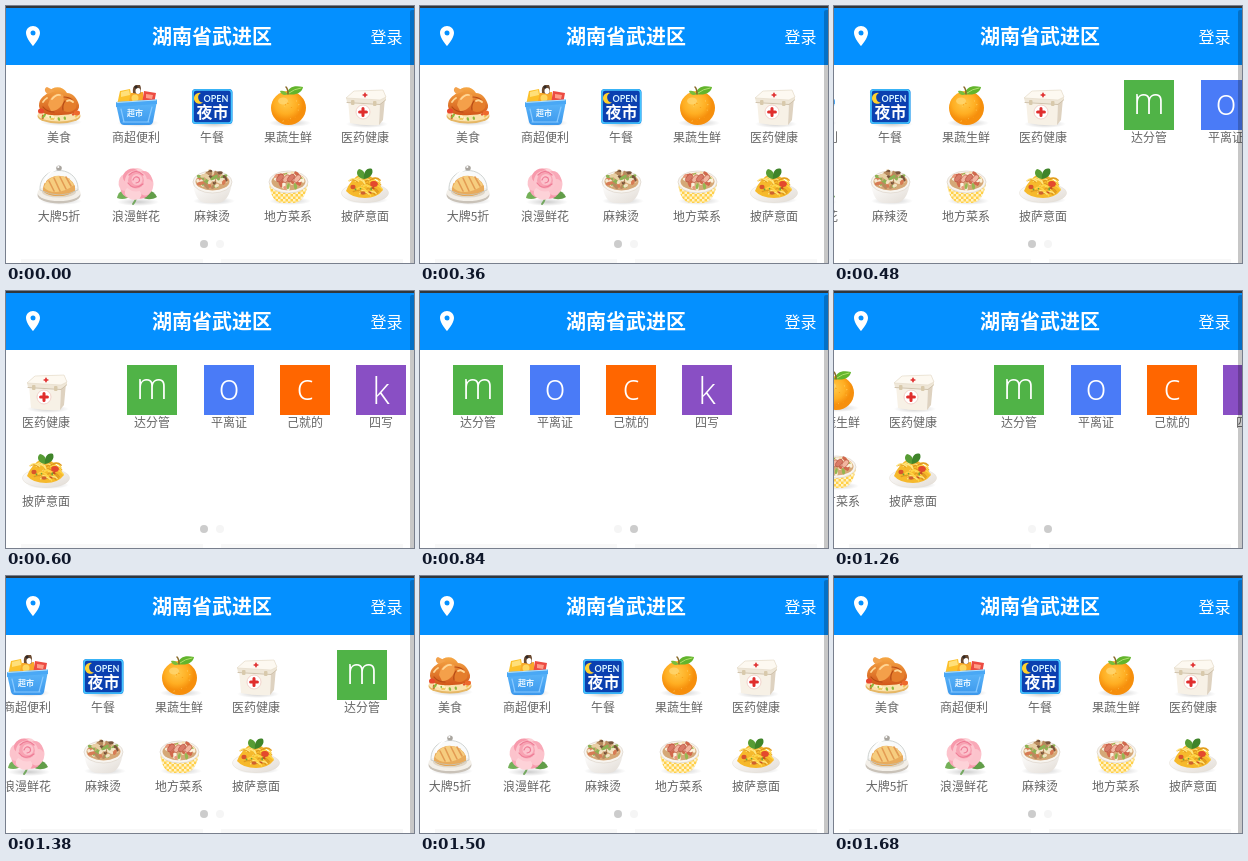
Write an HTML page that moves like this. It is 408 by 257 pixels and loops after 2.28 s.

```html
<!DOCTYPE html>
<html lang="zh">
<head>
<meta charset="utf-8">
<style>
html, body { margin: 0; width: 100%; height: 100%; overflow: hidden; background: #fff; }
svg { display: block; }
text { font-family: "Noto Sans CJK SC", "Noto Sans CJK", "Noto Sans", sans-serif; text-anchor: middle; }
.label { font-size: 12px; fill: #666; }
.letter { font: 300 36px "Open Sans", "Noto Sans", sans-serif; fill: #fff; }
.sign { font: 700 9px Lato, Inter, sans-serif; fill: #d8f4ff; }
</style>
</head>
<body>
<svg id="stage" width="408" height="257" viewBox="0 0 408 257">
  <defs>
    <linearGradient id="roast" x2="0" y2="1"><stop stop-color="#f6a845"/><stop offset="1" stop-color="#d2571a"/></linearGradient>
    <radialGradient id="peel" cx=".42" cy=".35"><stop stop-color="#ffc94a"/><stop offset=".65" stop-color="#ffae22"/><stop offset="1" stop-color="#f68f0c"/></radialGradient>
    <linearGradient id="basket" x2="0" y2="1"><stop stop-color="#5cb6fa"/><stop offset="1" stop-color="#3c98ec"/></linearGradient>
    <linearGradient id="china" x2="1" y2="1"><stop stop-color="#fff"/><stop offset="1" stop-color="#e2dcd5"/></linearGradient>
    <pattern id="checks" width="5" height="5" patternUnits="userSpaceOnUse">
      <path d="M0 0h5v5H0z" fill="#ffd04a"/><path d="M0 0h2.5v2.5H0zM2.5 2.5H5V5H2.5z" fill="#fff3c8"/>
    </pattern>
    <radialGradient id="shade"><stop stop-color="#000" stop-opacity=".2"/><stop offset="1" stop-color="#000" stop-opacity="0"/></radialGradient>
  </defs>
  <rect width="408" height="257" fill="#fff"/>
  <g id="slides"></g>
  <circle class="dot" cx="198" cy="238" r="4"/>
  <circle class="dot" cx="214" cy="238" r="4"/>
  <path d="M15 253h182v4h-182zM215 253h182v4h-182z" fill="#f8f8f8"/>
  <rect width="408" height="59" fill="#0490ff"/>
  <rect width="408" height="2" fill="#30373d"/>
  <path transform="translate(15 18)" fill="#fff" fill-rule="evenodd" d="M12 2C8.1 2 5 5.1 5 9c0 5.2 7 13 7 13s7-7.8 7-13c0-3.9-3.1-7-7-7zm0 4.5a2.5 2.5 0 1 1 0 5a2.5 2.5 0 0 1 0-5z"/>
  <text x="206" y="37.5" font-size="20" font-weight="700" fill="#fff">湖南省武进区</text>
  <text x="380.5" y="37" font-size="16" fill="#fff">登录</text>
  <path d="M404 257V6q0-2 2-2h2V257z" fill-opacity=".22"/>
</svg>
<script>
const LOOP = 2280, STEP = 60, PAGE = 412, COLUMN = 76.4, FIRST = 53.2;

let seed = 7;
const rnd = () => (seed = (seed * 16807) % 2147483647) / 2147483647;
const pick = list => list[Math.floor(rnd() * list.length)];
const path = (d, fill, extra = '') => `<path d="${d}" fill="${fill}" ${extra}/>`;
const line = (d, color, width = 1) => path(d, 'none', `stroke="${color}" stroke-width="${width}" stroke-linecap="round"`);
const oval = (x, y, rx, ry, fill, extra = '') => `<ellipse cx="${x}" cy="${y}" rx="${rx}" ry="${ry}" fill="${fill}" ${extra}/>`;
const box = (x, y, w, h, r, fill, extra = '') => `<rect x="${x}" y="${y}" width="${w}" height="${h}" rx="${r}" fill="${fill}" ${extra}/>`;
const shadow = (y = 42) => oval(27, y, 21, 4, 'url(#shade)');
const cross = (x, y, r) => line(`M${x - r} ${y}h${2 * r}M${x} ${y - r}v${2 * r}`, '#e02d2d', r * .9);

// Small bits of food strewn over an oval
function strew(n, x, y, rx, ry, colors, size = 2) {
  let out = '';
  for (let i = 0; i < n; i++) {
    const a = rnd() * Math.PI * 2, d = Math.sqrt(rnd());
    const px = x + Math.cos(a) * d * rx, py = y + Math.sin(a) * d * ry;
    out += oval(px, py, size * (.7 + rnd()), size * .65, pick(colors), `transform="rotate(${rnd() * 180} ${px} ${py})"`);
  }
  return out;
}

const chicken = () => shadow() +
  oval(25, 36, 21.5, 7.5, '#e6b765') + oval(25, 34.5, 21, 7, '#fae3ae') +
  strew(18, 25, 36, 18, 4, ['#f2c95c', '#8cb83c', '#e2552e', '#fff0c5'], 1.8) +
  path('M5 26C5 18 10 16 14 13C19 5 29 6 33 13C39 13 43 18 45 25C46 32 38 35 27 35C14 36 6 34 5 26z', 'url(#roast)') +
  path('M14 14C10 12 10 8 13 7L21 11z', '#f3a24c') +
  path('M14 25C16 15 23 11 29 15C32 23 25 31 17 31z', '#f4a04a') +
  path('M30 20C37 14 44 20 42 28C38 33 31 33 28 29z', '#e57e2c') +
  line('M9 27q4 5 11 5M30 17q5 0 8 3M31 21q-3 4-2 9', '#b54a16', 1.2) +
  line('M18 19q4-5 8-4M33 21q3-2 6 1M9 22q2-3 4-4', '#ffd897', 1.8) +
  oval(7, 31, 3, 2.6, '#e8482e') + oval(43, 33, 3, 2.4, '#ee6a2c');

const basket = () => shadow(43) +
  path('M6 25L9 11L19 9L22 25z', '#fcc12c') + path('M10 12l8-2 1 5-9 2z', '#ffe07a') +
  path('M17 25L20 13L32 12L33 25z', '#f9a928') + oval(24, 18, 3.5, 3.5, '#ffd75e') +
  path('M22 13Q21 6 25 5H29Q31 9 29 14z', '#6b4a31') + oval(27, 11, 2.5, 3, '#fff') + oval(25, 7, 1.6, 1.6, '#2f2927') +
  path('M31 24L33 11L45 13L43 24z', '#ec4b42') + path('M35 14l7 1-1 4-6-1z', '#ff9c86') +
  path('M5 24L46 21L42 42Q41 45 38 45H13Q10 45 9 42z', 'url(#basket)') +
  path('M5 22L46 19.5V24L5 27z', '#4aa8f5') + line('M6 22.5L45 20', '#b4e1ff') +
  line('M10 29l3 13M41 27l-4 15M12 42H38', '#87c9ff', 1.2) +
  '<text x="24" y="36" font-size="8" font-weight="700" fill="#e8f6ff">超市</text>';

const night = () => shadow(44) +
  box(5, 9, 40.5, 35, 3.5, '#0f7be0') + box(6, 10, 38.5, 33, 3, '#0b40b0', 'stroke="#45c6ff" stroke-width="1.6"') +
  path('M14 13A5.5 5.5 0 1 0 16 22.5A5 5 0 0 1 14 13z', '#ffd12f') +
  '<text class="sign" x="29" y="21.5">OPEN</text>' +
  '<text x="25.5" y="38" font-size="16" font-weight="700" fill="#fff">夜市</text>';

const orange = () => shadow(43) +
  oval(25.5, 28, 17.5, 17, 'url(#peel)') +
  strew(16, 25, 30, 13, 12, ['#f99c15', '#ffcb5c'], .6) + oval(20, 21, 5, 3.5, '#ffd978', 'fill-opacity=".7"') +
  path('M24 14C25 7 31 5 40 7C39 13 32 16 24 14z', '#62b52c') + line('M26 13Q31 9 38 8', '#b0df6c') +
  path('M25 14C22 11 20 10 17 11C18 15 22 16 25 14z', '#79bd3b') + line('M25 14Q25 9 23 7', '#8a6a2a', 1.5);

const medicine = () => shadow(44) +
  path('M8 20L40 22L39 45Q24 46 10 43z', '#f7f1e6') + path('M40 22L45 18L43 40L39 45z', '#ded2c0') +
  path('M6 18L14 11L43 10L46 17V20L40 24L7 22z', '#efe7d8') +
  path('M6 18L14 11L43 10L46 17L40 20z', '#fdf9f1', 'stroke="#e2d8c6" stroke-width=".6"') +
  line('M7 22.5L40 24.5L45.5 20', '#cfc2ac') + cross(25, 15, 1.8) +
  oval(23, 32, 7, 7, '#fff', 'stroke="#efc9c0" stroke-width=".8"') + cross(23, 32, 3.4) +
  box(11, 20, 3.5, 5, 1, '#d8c9ab') + box(33, 21, 3.5, 5, 1, '#d8c9ab');

const cake = () => shadow() +
  oval(25, 36, 21.5, 8.5, '#c9c2b8') + oval(25, 34, 21.5, 8, '#f3efe8') + oval(25, 33, 17, 5.5, '#e0d6c6') +
  path('M9 29Q10 20 21 17Q35 15 41 27V32Q34 37 25 37Q13 37 9 32z', '#e99a34') +
  path('M10 28Q12 20 22 17Q35 16 40 26Q31 33 22 33Q13 33 10 28z', '#fbc561') +
  line('M15 22l5 10M20 19l6 13M26 18l6 12M32 18l5 9', '#e28629', 1.6) +
  path('M6 31C5 5 45 5 44 31Q25 41 6 31z', '#e3e8e6', 'fill-opacity=".22" stroke="#c3c8c6" stroke-width=".8"') +
  line('M11 23Q13 14 21 11', '#fff', 1.8) + oval(25, 9, 2.8, 2.6, '#a9a59f') + oval(24.3, 8, 1.1, .9, '#fff');

function rose() {
  let out = shadow(43) + path('M17 32C11 30 7 33 6 39C11 41 17 40 21 36z', '#74b058') +
    path('M33 33C38 30 43 32 46 38C41 41 35 41 31 38z', '#629d49') + line('M25 38Q25 42 22 45', '#74a860', 1.8);
  const tones = ['#fcc3cc', '#f9a9b8', '#fdd2d8', '#f79aac'];
  for (let i = 0; i < 9; i++) {
    const a = i * 2.4, px = 25 + Math.cos(a) * 11, py = 25 + Math.sin(a) * 9.5;
    out += oval(px, py, 8.5, 6.5, tones[i % 4], `transform="rotate(${a * 57.3 + 90} ${px} ${py})"`);
  }
  return out + oval(25, 22, 11, 10.5, '#fcc5ce') + oval(25, 21.5, 8, 8, '#f8a3b3') +
    oval(26, 20.5, 5.5, 5.5, '#fcc3cd') + line('M22 21Q24 16 28 19Q30 23 25 24M17 24Q23 32 32 25M18 16Q25 9 32 16', '#ee7c96', 1.2);
}

const bowl = (body, colors, size) => shadow() +
  path('M6 24Q8 43 19 44H31Q42 43 45 24z', 'url(#china)') + path('M6 24Q8 43 19 44H31Q42 43 45 24z', body) +
  oval(25.5, 23, 19.5, 11, '#f8f5f0', 'stroke="#ddd5ca" stroke-width=".7"') + oval(25.5, 22.5, 17, 9, '#d5a877') +
  strew(40, 25.5, 21, 14.5, 8, colors, size);

const hotpot = () => bowl('none', ['#b88a5e', '#e8cfa4', '#f6ebd3', '#8db254', '#7a563c', '#d77b54', '#f3e3c4'], 2.6);
const noodles = () => bowl('url(#checks)', ['#e9997c', '#f8e2b6', '#d1694c', '#fbf1dc', '#95b750'], 2.4) +
  [0, 1, 2, 3].map(i => oval(17 + i * 5.5, 19 + i % 2, 4.5, 2.6, i % 2 ? '#f2b6a0' : '#d97c68',
    `transform="rotate(-50 ${17 + i * 5.5} 19)" stroke="#b9503e" stroke-width=".6"`)).join('');

function pasta() {
  let out = shadow(41) + oval(25, 34, 23.5, 9.5, 'url(#china)', 'stroke="#e3ddd2" stroke-width=".5"') +
    path('M6 32Q10 21 20 15Q33 14 43 31Q37 39 25 39Q12 39 6 32z', '#f6b92c');
  for (let i = 0; i < 28; i++) {
    const x = 9 + rnd() * 23, y = 20 + rnd() * 15;
    out += line(`M${x} ${y}q${3 + rnd() * 4} ${-5 + rnd() * 3} ${8 + rnd() * 3} ${rnd() * 4}`, pick(['#ffe680', '#e09a1f', '#ffd545']), 1.3);
  }
  return out + oval(13, 28, 2.6, 2.2, '#d9542c') + oval(34, 25, 3.8, 3, '#e4492e') + oval(23, 34, 2.6, 1.8, '#cf6230') +
    path('M24 20C17 19 15 13 19 10C24 11 26 15 24 20z', '#579c34') +
    path('M24 20C23 13 27 8 32 10C34 15 30 19 24 20z', '#3f842a') + strew(7, 25, 28, 13, 6, ['#6fa337', '#c84f24'], 1.2);
}

const tile = (color, letter, base) => () => box(0, 0, 50, 50, 0, color) +
  `<text class="letter" x="25" y="${base}">${letter}</text>`;

const pages = [
  [['美食', chicken], ['商超便利', basket], ['午餐', night], ['果蔬生鲜', orange], ['医药健康', medicine],
   ['大牌5折', cake], ['浪漫鲜花', rose], ['麻辣烫', hotpot], ['地方菜系', noodles], ['披萨意面', pasta]],
  [['达分管', tile('#50b347', 'm', 34)], ['平离证', tile('#4a7bf7', 'o', 34.5)],
   ['己就的', tile('#ff6600', 'c', 34.5)], ['四写', tile('#894fc4', 'k', 38.5)]]
];

const slides = document.getElementById('slides');
const dots = document.querySelectorAll('.dot');
const items = pages.flatMap((page, p) => page.map(([name, draw], i) => {
  const row = Math.floor(i / 5);
  slides.insertAdjacentHTML('beforeend',
    `<g>${draw()}</g><text class="label" y="${136 + row * 79}">${name}</text>`);
  const label = slides.lastElementChild;
  return { icon: label.previousElementSibling, label, x: FIRST + p * PAGE + (i % 5) * COLUMN, y: 74 + row * 79 };
}));

// Each swipe: a finger drag, then an eased settle
const swipes = [
  { at: 360, release: 660, x: [5, 58, 150, 247, 319, 328, 367, 393, 407, 411.4, 412] },
  { at: 1140, release: 1380, x: [410, 372, 280, 178, 109, 56, 23, 6, .4, 0] }
];

function render(time) {
  let shift = 0, active = 0;
  swipes.forEach((swipe, i) => {
    if (time >= swipe.at) {
      const step = Math.floor((time - swipe.at) / STEP);
      shift = swipe.x[Math.min(step, swipe.x.length - 1)];
    }
    if (time >= swipe.release) active = 1 - i;
  });
  for (const { icon, label, x, y } of items) {
    icon.setAttribute('transform', `translate(${Math.round(x - 25 - shift)} ${y})`);
    label.setAttribute('x', Math.round(x - shift));
  }
  dots.forEach((dot, i) => dot.setAttribute('fill', i === active ? '#ccc' : '#f5f5f5'));
}

const start = performance.now();
function tick() {
  render((performance.now() - start) % LOOP);
  requestAnimationFrame(tick);
}
tick();
</script>
</body>
</html>
```
